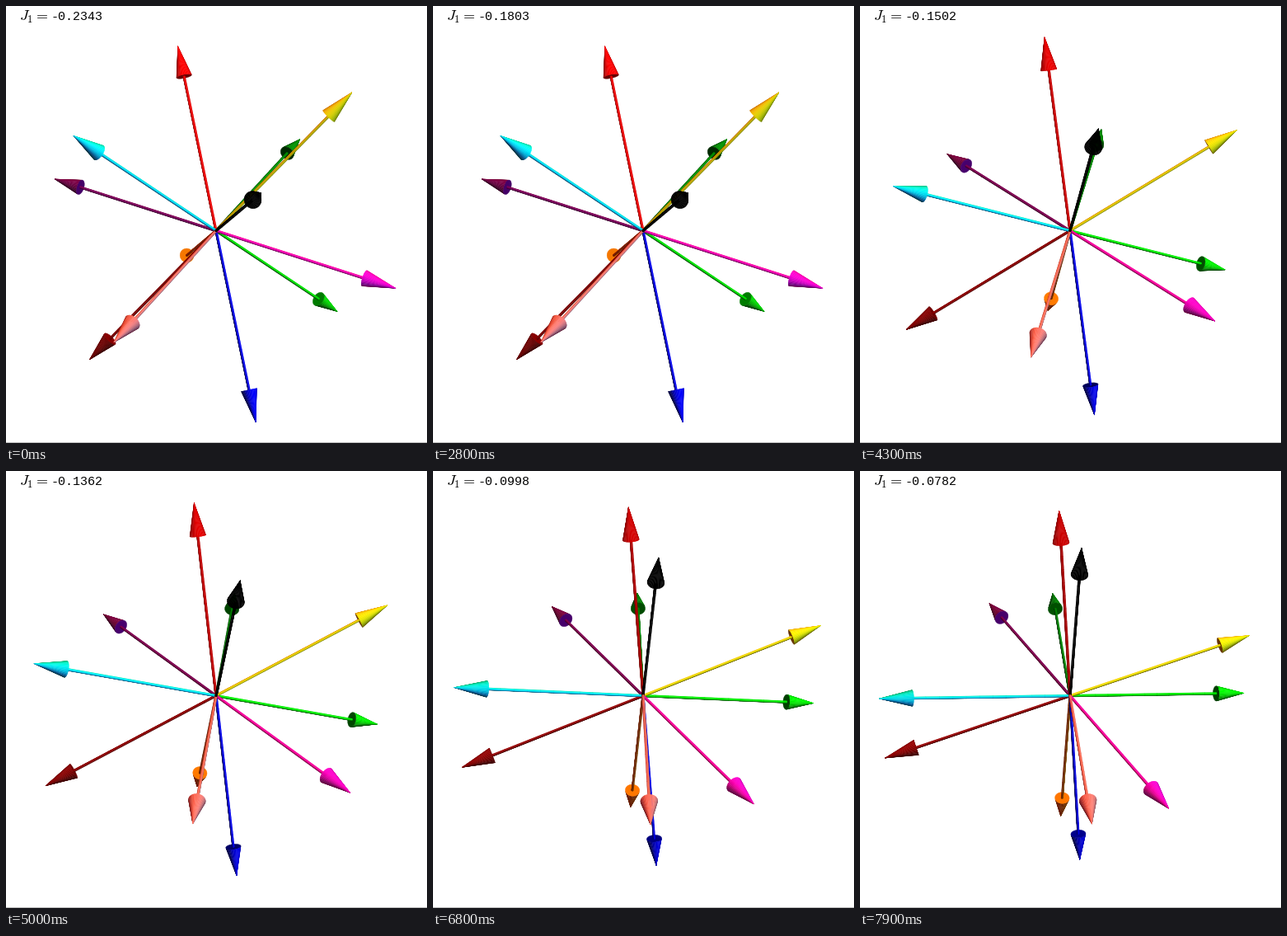
A matplotlib script that plays this animation: 511x530 px, repeating every 8 s.

```python
import numpy as np
import matplotlib.pyplot as plt
from matplotlib.animation import FuncAnimation
from matplotlib.collections import PolyCollection

W, H, DPI = 511, 530, 64
FRAMES, INTERVAL = 80, 100
CENTER = np.array([255.0, 272.6])
DIST = 1677.0                      # eye distance in pixels
LENGTH, BASE = 234.5, 0.835        # arrow length, start of the head
HEAD_R, TUBE_R = 9.5, 1.45

# Cube axes seen by the camera: x right, y up, z towards the eye
view = np.array([1.3, -2.4, 2.0])
elev = np.arcsin(view[2] / np.linalg.norm(view))
turn = np.pi / 4 - np.arctan2(1.3, 2.4)
ce, se, ct, st = np.cos(elev), np.sin(elev), np.cos(turn), np.sin(turn)
A = np.array([0, ce, se])
B = np.array([-ct, -st * se, st * ce])
U = np.array([-st, ct * se, -ct * ce])

# (main axis, side axis, colour, colour of the opposite arrow)
PAIRS = [
    (A, U, (1, 0, 0), (0, 0, 1)),
    (A, -U, (0, 0, 0), (1, .5, 0)),
    (B, A, (0, 1, 1), (0, 1, 0)),
    (B, -A, (.6, 0, 0), (1, 1, 0)),
    (U, B, (.5, 0, .5), (1, 0, 1)),
    (U, -B, (0, .6, 0), (1, .5, .5)),
]

AMBIENT = np.array([.4, .2, .2])
LIGHT_DIR = np.array([[2, 0, 2], [2, 2, 3], [0, 2, 2], [0, 0, 2]], float)
LIGHT_DIR /= np.linalg.norm(LIGHT_DIR, axis=1, keepdims=True)
LIGHT_RGB = np.array([[0, .18, .5], [.18, .5, .18], [.5, .18, 0], [0, 0, .18]])


def coupling(i):
    return np.interp(i, [0, 24, 25, 28, 37, 43, 58, 68, 79],
                     [-.2343, -.1863, -.1863, -.1803, -.1622,
                      -.1502, -.1201, -.0998, -.0782])


def half_angle(j):
    """Locked at 45 degrees until the coupling passes the critical value."""
    s = abs(j) / (.241 - .366 * abs(j))
    return np.arcsin(min(s, 1)) / 2


def shade(color, normal):
    light = AMBIENT + np.clip(LIGHT_DIR @ normal, 0, None) @ LIGHT_RGB
    return np.clip(np.array(color) * light, 0, 1)


def project(p):
    scale = DIST / (DIST - p[:, 2:])
    return CENTER + p[:, :2] * scale * [1, -1]


def ring(w, n):
    """Unit vectors around the axis w, at n edges and n face middles."""
    u = np.cross(w, [.31, .52, .79])
    u /= np.linalg.norm(u)
    v = np.cross(w, u)
    a = np.arange(2 * n + 1) * np.pi / n
    r = np.outer(np.cos(a), u) + np.outer(np.sin(a), v)
    return r[::2], r[1::2]


def arrow_faces(w, color):
    tip, base = w * LENGTH, w * LENGTH * BASE
    faces = []

    def add(points, normal):
        mid = np.mean(points, axis=0)
        if normal @ (np.array([0, 0, DIST]) - mid) > 0:
            faces.append((mid[2], points, shade(color, normal)))

    edges, mids = ring(w, 8)
    cuts = np.linspace(0, 1, 13)[:, None] * base
    for k, m in enumerate(mids):
        e0, e1 = edges[k] * TUBE_R, edges[k + 1] * TUBE_R
        for p, q in zip(cuts[:-1], cuts[1:]):
            add(np.array([p + e0, p + e1, q + e1, q + e0]), m)

    edges, mids = ring(w, 36)
    rim = base + edges * HEAD_R
    side = LENGTH * (1 - BASE)
    for k, m in enumerate(mids):
        normal = (m * side + w * HEAD_R) / np.hypot(side, HEAD_R)
        add(np.array([rim[k], rim[k + 1], tip]), normal)
    add(rim[:-1], -w)
    return faces


fig = plt.figure(figsize=(W / DPI, H / DPI), dpi=DPI, facecolor="white")
ax = fig.add_axes([0, 0, 1, 1])
ax.set(xlim=(0, W), ylim=(H, 0))
ax.axis("off")

px = 72 / DPI
plt.rcParams["mathtext.fontset"] = "cm"
ax.text(16, 18, r"$J_1=$", fontsize=18 * px, va="baseline")
value = ax.text(54.5, 17.3, "", fontsize=15 * px, va="baseline",
                family="Liberation Mono")
ax.plot([0, W], [528.5, 528.5], color="0.75", lw=1 * px)
solid = PolyCollection([], linewidths=.4 * px)
ax.add_collection(solid, autolim=False)


def update(i):
    j = coupling(i)
    d = half_angle(j)
    faces = []
    for main, side, front, back in PAIRS:
        w = main * np.cos(d) + side * np.sin(d)
        faces += arrow_faces(w, front) + arrow_faces(-w, back)
    faces.sort(key=lambda f: f[0])
    colors = [f[2] for f in faces]
    solid.set_verts([project(f[1]) for f in faces])
    solid.set_facecolor(colors)
    solid.set_edgecolor(colors)
    value.set_text(f"{j:.4f}")
    return solid, value


anim = FuncAnimation(fig, update, frames=FRAMES, interval=INTERVAL,
                     init_func=lambda: (solid, value), repeat=True,
                     repeat_delay=0)
plt.show()
```
